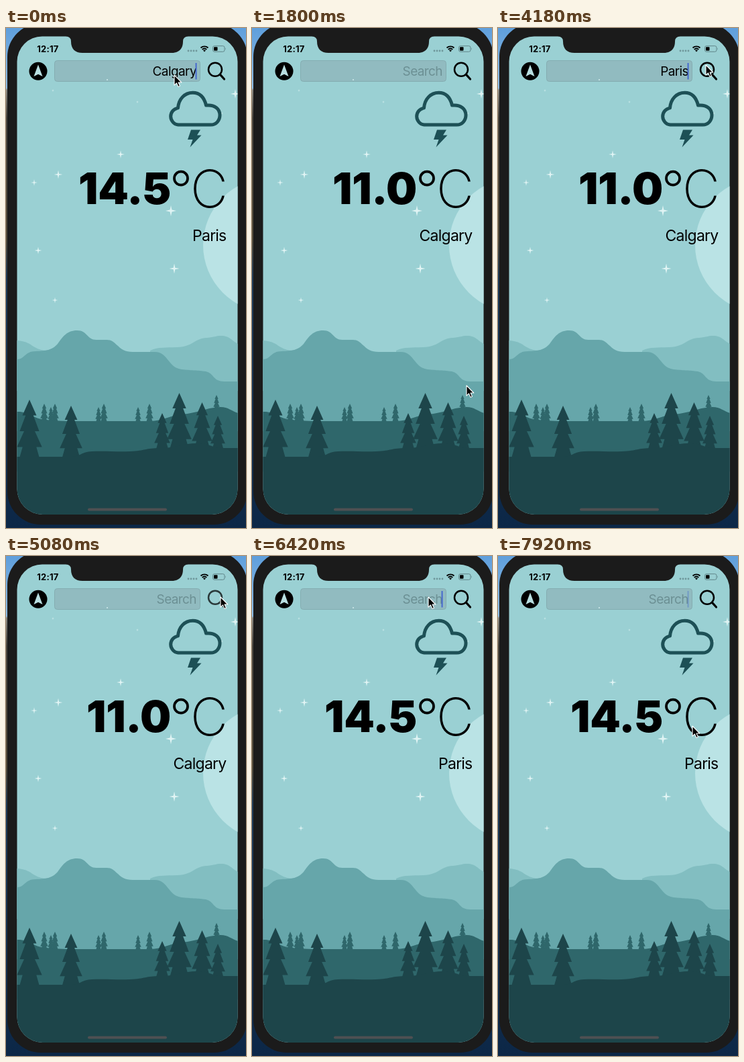
Write an HTML page that moves like this. It is 358 px wide and 744 px high and loops after 8 s.

```html
<!DOCTYPE html>
<html lang="en">
<meta charset="utf-8">
<title>Weather app</title>
<style>
  html, body { margin: 0; width: 358px; height: 744px; overflow: hidden }
  svg { display: block }
  text { font-family: Inter, Roboto, sans-serif }
  .end { text-anchor: end }
  .field { font-size: 19px; letter-spacing: -.6px }
  .city { font-size: 23px; letter-spacing: -.75px }
  .temp { font-size: 65px; font-weight: 900; letter-spacing: -.3px }
  .unit { font-size: 77px; font-weight: 230 }
</style>
<svg width="358" height="744" viewBox="0 0 358 744">
  <defs>
    <linearGradient id="desk" x2="0" y2="1">
      <stop stop-color="#5f9fdc"/><stop offset=".12" stop-color="#8dbbe3"/>
      <stop offset=".124" stop-color="#8a8880"/><stop offset=".18" stop-color="#4b463e"/>
      <stop offset=".42" stop-color="#534a38"/><stop offset=".5" stop-color="#1d3a58"/>
      <stop offset="1" stop-color="#0c2747"/>
    </linearGradient>
    <path id="screen" d="M54 12.5H89Q97 12.5 97 20C97 31 103 37 114 37H247C258 37 264 31 264 20Q264 12.5 272 12.5H308A37.5 37.5 0 0 1 345.5 50V686A38 38 0 0 1 307.5 724H54.5A38 38 0 0 1 16.5 686V50A37.5 37.5 0 0 1 54 12.5Z"/>
    <clipPath id="clip"><use href="#screen"/></clipPath>
  </defs>

  <rect width="358" height="744" fill="url(#desk)"/>
  <rect x="2" y="-7" width="358" height="746" rx="50" fill="#1b1b1b"/>

  <g clip-path="url(#clip)">
    <rect width="358" height="744" fill="#9ad0d3"/>
    <circle cx="394" cy="323" r="100" fill="#bae3e5"/>
    <g id="stars" fill="#e0f4f4"></g>
    <path fill="#82bec1" d="M16 465C32 466 36 471 43 475S55 480 65 480V530H215V480C228 474 238 476 255 475C280 474 280 462 300 461C312 460 312 458 321 458C334 458 336 465 346 470V540H16Z"/>
    <path fill="#66a6aa" d="M16 493C28 493 28 481 44 481C60 480 68 480 77 470C85 459 91 450 106 450C122 450 120 464 135 464H150C158 464 160 467 167 473C175 481 180 482 194 482H222C242 482 241 505 262 508C280 510 285 509 298 511C311 514 308 526 326 526H346V600H16Z"/>
    <g id="far" fill="#2f676b"></g>
    <path fill="#2f676b" d="M16 571C34 570 40 582 60 583C80 585 90 585 110 585H210C236 585 244 576 262 575C286 573 298 565 320 564C332 564 336 570 346 573V660H16Z"/>
    <g id="near" fill="#1d454a"></g>
    <path fill="#1d454a" d="M16 638H98C112 637 112 631 128 630C150 629 165 631 185 630C208 629 208 625 230 625C256 625 258 619 282 618C304 617 306 625 324 625H346V724H16Z"/>
  </g>
  <rect x="122" y="714.5" width="118" height="4" rx="2" fill="#4f5052"/>

  <!-- status bar -->
  <text x="46.3" y="35.5" font-size="13" font-weight="700" letter-spacing=".15">12:17</text>
  <path d="M272 34H284.1" stroke="#6f979b" stroke-width="2.8" stroke-linecap="round" stroke-dasharray="0 4"/>
  <path d="M290.5 29.5A8 8 0 0 1 301.5 29.5M292.7 32A5 5 0 0 1 299.3 32" fill="none" stroke="#000" stroke-width="1.8"/>
  <path d="M294 33.3Q296 31.8 298 33.3L296 35.5Z"/>
  <rect x="308.5" y="26.7" width="17.5" height="8.6" rx="2.4" fill="none" stroke="#608589"/>
  <rect x="310" y="28.2" width="5.5" height="5.6" rx="1"/>
  <path d="M327.2 29.5q1.4 1.5 0 3z" fill="#608589"/>

  <!-- search bar -->
  <circle cx="48" cy="64.3" r="13.5"/>
  <path d="M48 54.5L54.5 72L48 68.8L41.5 72Z" fill="#b9dfe1"/>
  <rect x="72.5" y="48.5" width="217" height="31" rx="4" fill="#91bbc0" stroke="#84adb1"/>
  <circle cx="151" cy="77" r="1" fill="#d5ecee"/>
  <text id="query" class="field end" x="284" y="70.7"></text>
  <rect id="caret" x="282.6" y="52" width="1.9" height="24.5" fill="#4265cf"/>
  <g id="lens" fill="none" stroke="#000">
    <circle cx="312" cy="61.8" r="10" stroke-width="2.5"/>
    <path d="M319.3 69.2L325.5 76" stroke-width="3.2" stroke-linecap="round"/>
  </g>

  <!-- weather -->
  <g transform="translate(.5 -.4)">
    <path d="M256.5 144.5A12.6 12.6 0 0 1 256 119.5C257 106 266 96.7 278 96.7C288 96.7 295 103 298 115.5C311 114 318.5 121 318.5 130C318.5 138 313 144.5 305 144.5Z" fill="none" stroke="#1d5056" stroke-width="5" stroke-linejoin="round"/>
    <path d="M275.5 152H289.5L284.5 160H291L274 178L278 166.5H270.5Z" fill="#1d5056"/>
  </g>
  <text id="temp" class="temp end" x="246" y="262"></text>
  <circle cx="261" cy="223.7" r="10" fill="none" stroke="#000" stroke-width="3.8"/>
  <text class="unit" x="275" y="266.5">C</text>
  <text id="city" class="city end" x="328.5" y="317"></text>

  <path id="pointer" d="M0 0V15.2L3.5 11.9L5.9 17.4L8.4 16.3L6.1 11H10.8Z" stroke="#fff" stroke-width="1.1" stroke-linejoin="round"/>
</svg>
<script>
const $ = id => document.getElementById(id);

function star([x, y], r) {
  const points = Array.from({ length: 8 }, (_, i) => {
    const d = i % 2 ? r * .25 : r, a = i * Math.PI / 4;
    return [x + d * Math.cos(a), y + d * Math.sin(a)];
  });
  return `<polygon points="${points}"/>`;
}
// from the largest to the smallest
const bright = [[246,272], [251,358], [342,98], [78,218], [171,188], [48,331], [42,230], [73,405]];
const faint = [0, 1, 2].map(i => [70 + 126 * i, 93 + 17 * i]);
$('stars').innerHTML = bright.map((p, i) => star(p, 8 - .55 * i)).join('') + faint.map(p => star(p, 2)).join('');

// three tiers, each wider than the one above, on a flared trunk
function tree(x, top, base) {
  const h = base - top, w = h * .215, side = [[0, 0]];
  for (let tier = 1; tier <= 3; tier++) {
    const out = .34 + .22 * tier;
    side.push([out, .27 * tier], [out * .55, .27 * tier]);
  }
  side.push([.8, 1]);
  const half = s => side.map(([u, v]) => [x + s * u * w, top + v * h]);
  return `<polygon points="${[...half(1), ...half(-1).reverse()]}"/>`;
}
$('near').innerHTML = [[35,553], [97,562], [233,573], [258.5,543], [292.5,557], [316,577]]
  .map(([x, top]) => tree(x, top, x < 200 ? 640 : 628)).join('');
$('far').innerHTML = [57, 67, 73, 138, 146, 197, 214, 314].map((x, i) => {
  const base = x < 300 ? 586 : 568;
  return tree(x, base - (i % 2 ? 22 : 27), base);
}).join('');

// pointer moves: first step, last step, where to
const STEP = 150;
const moves = [[1050,1200,328,539], [1800,1800,320,532], [1950,2550,236,67], [4180,4180,310,55],
  [4330,4480,344,63], [4630,4930,320,61], [5670,5970,263,61], [7470,7920,290,253]];
const ease = p => p * p * (3 - 2 * p);

function pointerAt(t) {
  let x = 251, y = 70;
  for (const [start, end, toX, toY] of moves) {
    if (t < start) break;
    const steps = Math.floor((t - start) / STEP) + 1;
    const p = ease(Math.min(1, steps * STEP / (end - start + STEP)));
    x += (toX - x) * p;
    y += (toY - y) * p;
  }
  return [x, y];
}

function queryAt(t) {
  if (t < 150) return 'Calgary';
  return t < 5080 ? 'Paris'.slice(0, Math.max(0, 1 + Math.floor((t - 3290) / 110))) : '';
}

function caretAt(t) {
  if (t < 300) return t < 150 ? 1 : .4;
  if (t >= 6420) return (t - 6420) % 900 < 600 ? 1 : .4;
  return t >= 2690 && t < 5080 ? 1 : 0;
}

function draw(now) {
  const t = now % 8000, typed = queryAt(t), away = t >= 600 && t < 5220;
  $('query').textContent = typed || 'Search';
  $('query').setAttribute('fill', typed ? '#000' : '#6c9094');
  $('caret').setAttribute('opacity', caretAt(t));
  $('lens').setAttribute('opacity', t >= 5080 && t < 5220 ? .72 : 1);
  $('temp').textContent = away ? '11.0' : '14.5';
  $('city').textContent = away ? 'Calgary' : 'Paris';
  $('pointer').setAttribute('transform', `translate(${pointerAt(t)})`);
  requestAnimationFrame(draw);
}
draw(0);
</script>
</html>
```
